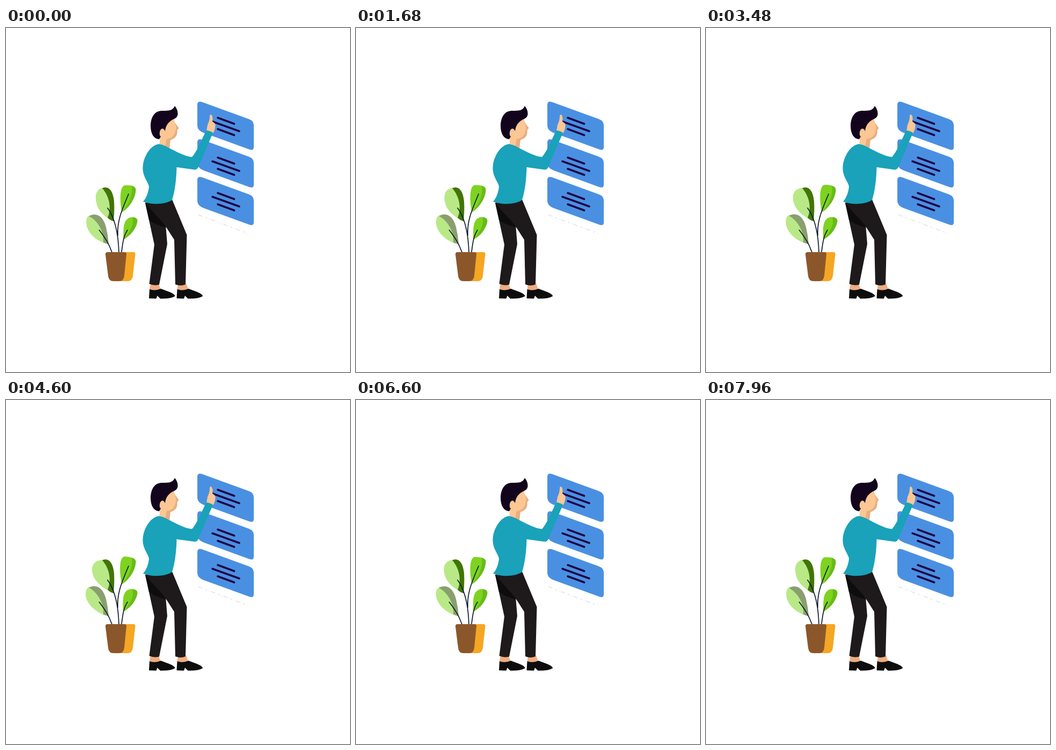
An HTML page that plays this animation: 640 by 640 pixels, repeating every 8 s.

```html
<!DOCTYPE html>
<html lang="en">
<head>
<meta charset="utf-8">
<title>Man arranging cards</title>
<style>
  html, body { margin: 0; width: 100%; height: 100%; overflow: hidden; background: #fff; }
  svg { display: block; width: 100%; height: 100%; }
  .line { fill: none; stroke: #1f0545; stroke-width: 3.6; stroke-linecap: round; }
  .stem { fill: none; stroke: #0c1a30; stroke-width: 1.7; stroke-linecap: round; }
  .skin { fill: #fdc794; }
  .shade { fill: #e8ae82; }
  .cloth { fill: #1e1a1c; }
  .shoe { fill: #0d0d0e; }
</style>
</head>
<body>
<svg viewBox="0 0 640 640">
  <defs>
    <path id="card" fill="#4a90e2" d="M356 143 Q356 135 364 137.5 L452 169.500 Q461 173 461 181 V221 Q461 229 453 226 L369 195.500 Q356 191 356 181 Z"/>
    <path id="text" class="line" d="M394 167 L424.500 178.300 M384 174 L434 192 M394 188 L424.500 199.300"/>
    <g id="foot">
      <path fill="#efad80" d="M268.500 476 H284 L288 488 Q277 491 267 487 Z"/>
      <path class="shoe" d="M267 486 Q277 490 288 485 L304 491 Q315 495.500 314.500 499 Q306 504 287 503.500 L281.500 498 L279.500 503.500 L266 503 Z"/>
    </g>
  </defs>

  <use href="#card"/><use href="#card" y="70"/><use href="#card" y="140"/>
  <use href="#text"/><use href="#text" y="74"/><use href="#text" y="140"/>
  <path d="M358 347.500 L452 383" fill="none" stroke="#c5c5cd" stroke-width=".8" stroke-dasharray="8 6 3 4 1 3"/>

  <!-- plant -->
  <path id="topLight" fill="#b8e986"/>
  <path fill="#417505" d="M179 298 C189 293 199 300 201 322 C202 338 201 350 200 359.500 Q194 358 189 353 C196 338 194 315 179 298 Z"/>
  <path id="lowLight" fill="#b8e986"/>
  <path id="lowDark" fill="#8a9f6f"/>
  <path id="tallLight" fill="#7ed321"/>
  <path fill="#68bb17" d="M234 293.500 C240 295 242 298 241.500 303 C240 318 230 333 216 343 C227 329 237 314 234 293.500 Z"/>
  <path id="smallLight" fill="#7ed321"/>
  <path fill="#68bb17" d="M235 352 C242 352 245 355 244.500 360 C242 374 232 386 218 394 C230 381 239 366 235 352 Z"/>
  <path class="stem" d="M189 335 C203 354 209 385 210 417 M228 309 C218 333 206 358 208 386 M173.500 376 C184 390 191 400 197 417 M226 376 C218 388 217 402 215 417"/>
  <path fill="#f5a623" d="M218 417 H237 Q241 417 240.500 421 L236 461 Q235 471 226 471 H205 Z"/>
  <path fill="#8b572a" d="M189 417 H220 Q224.500 417 224 421 L220 461 Q219 471 210 471 H200 Q191 471 190 461 L185 421 Q185 417 189 417 Z"/>

  <!-- legs -->
  <use href="#foot"/><use href="#foot" x="51.500"/>
  <path class="cloth" d="M259 325 L276 403 L266.500 476 Q275 480 285 477.500 L300 402 L297 365 Z"/>
  <path class="shoe" d="M259 325 L266 357 Q279 367 298 371 L285 335 Z"/>
  <path class="cloth" d="M259 325 C272 342 287 355 297 369 L313 394 L315 477 Q325 481 334 477 L336.500 385 L309 319 Z"/>

  <!-- head -->
  <path class="skin" d="M287 200 L285 219 L303 226 L306 207 Z"/>
  <path class="shade" d="M299 205 L296 222 L304 225 L306 206 Z"/>
  <path class="shade" d="M310 168 L315 177 L321.500 186 L318.500 190 Q320 205 305 208.500 L299 207 Z"/>
  <path class="skin" d="M294 180 L313 168 C312 176 318 181 316 188 C314 198 312 204 300 206.500 Q296 207 292 203 Q286 203 285.500 196 Q286 187 294 186 Z"/>
  <path fill="#12041d" d="M314 145 C318 150 320 155 319.500 161 C318 169 311 169 306 173 C300 178 297 183 296 192 C293 184 287 187 286 194 Q285 199 288 202 L285 207 C274 206 269 196 269 181 C270 164 277 154 291 154 C303 154 310 154 314 145 Z"/>

  <!-- torso and hand -->
  <path class="skin" d="M373 191 L375 180 Q379 172 379 165 Q379 161 381 161 Q384 162 384.500 168 L384 174 Q390 177 389.500 182 Q389 190 385 196 Z"/>
  <path fill="#19a2b9" d="M284 216 C268 218 254 242 254.500 262 C255 278 265 287 266 295 C265 307 260 318 255 323 C270 329 295 329 309 320 C314 305 317 282 317.500 259 L350 263.500 C355 264 357 261 359 256 L385 195 Q380 191 372.500 190.500 C364 208 354 232 346 240 C333 239 317 230 303 223 Q291 216 284 216 Z"/>
</svg>
<script>
  const LOOP = 8000, PEAK = 4700, LAST = 0.13;

  // Left edges of the leaves swell with k (0 = rest, 1 = fullest).
  const leaves = {
    topLight: k => `M180 297.500 C${172 - 5 * k} 298 ${166 - 7 * k} ${306 - k} ${167 - 7 * k} ${318 - k}
      C${168 - 7 * k} ${334 - k} ${177 - 3 * k} 346 190 354 L199 354 C198 336 194 310 180 297.500 Z`,
    lowLight: k => `M155 ${349 - k} C${150 - k} ${351 - k} ${149 - k} ${357 - k} ${149.5 - 1.3 * k} ${364 - k}
      C${151 - k} ${383 - k} 172 399 191 402 C190 380 172 353 155 ${349 - k} Z`,
    lowDark: k => `M154 ${350 - k} C168 ${342 - .6 * k} 181 350 186 370 Q190 386 191 402.500
      L181 399 C183 380 171 358 154 ${350 - k} Z`,
    tallLight: k => `M235 293.500 Q${226 - k} ${292 - 1.5 * k} ${220 - k} ${293 - 1.5 * k}
      C${212 - k} ${296 - k} ${211 - k} ${319 - k} 215.500 343 C229 330 239 310 235 293.500 Z`,
    smallLight: k => `M236 352 Q${228 - k} ${351 - .6 * k} ${222.5 - k} ${359 - k}
      C${217 - k} ${368 - k} ${219 - 1.5 * k} 384 218 394.500 C230 384 239 366 236 352 Z`
  };

  function draw(now) {
    const t = now % LOOP;
    const k = t < PEAK ? t / PEAK : 1 - (1 - LAST) * (t - PEAK) / (LOOP - PEAK);
    for (const id in leaves) document.getElementById(id).setAttribute('d', leaves[id](k));
    requestAnimationFrame(draw);
  }
  draw(performance.now());
</script>
</body>
</html>
```
